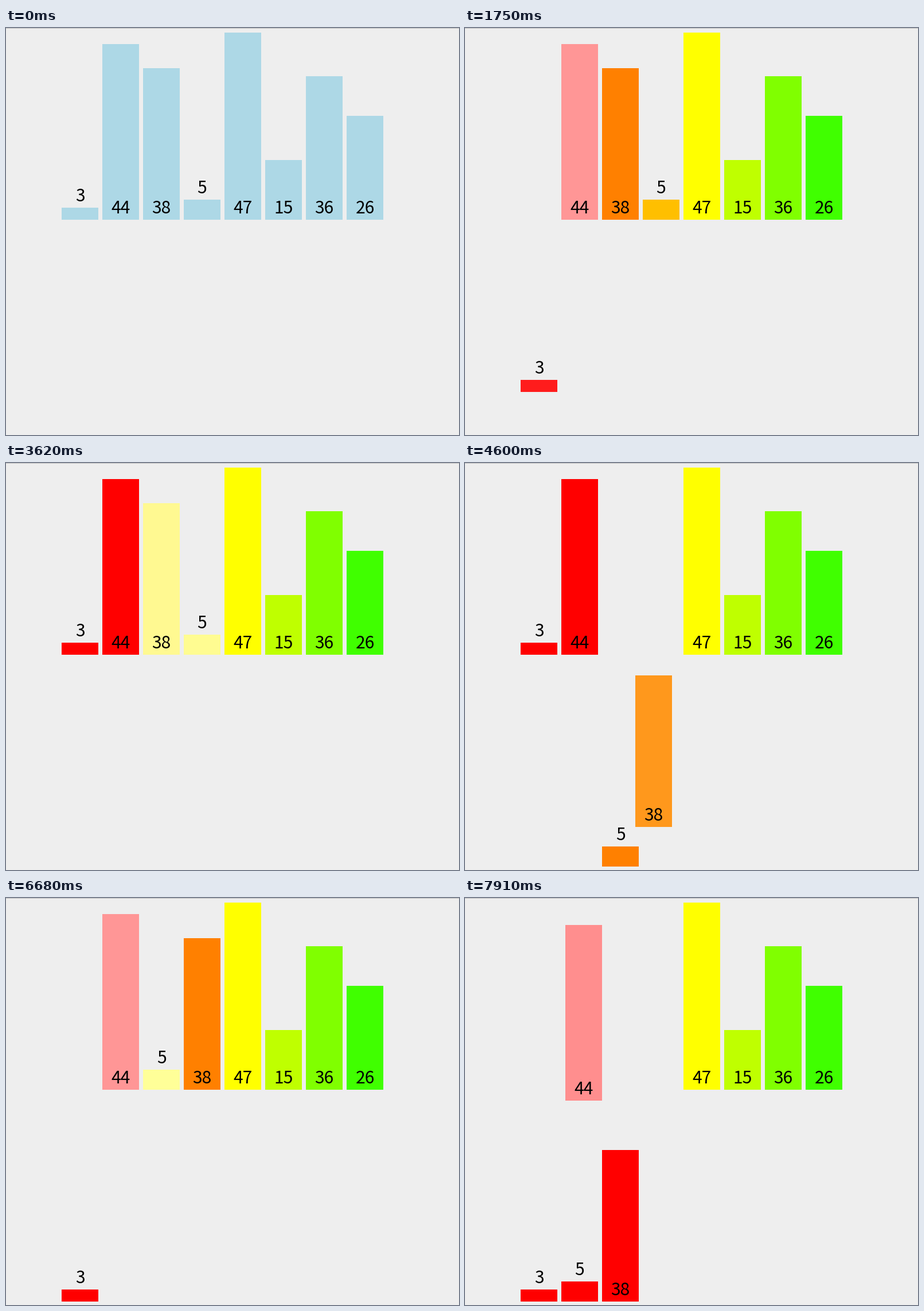
Recreate the animation shown at these times as a matplotlib script. Size 790x709 px, loop 8 s.

```python
import colorsys

import matplotlib.pyplot as plt
import numpy as np
from matplotlib.animation import FuncAnimation
from matplotlib.patches import Rectangle

W, H, DPI = 790, 709, 100
LOOP, STEP = 8000, 20
LEFT, PITCH, BAR_W = 97, 71, 64
BASE = (334, 703)          # baselines of the upper and lower row
UNIT = 6.945               # pixels per value
MOVE_MS = 250

VALUES = [3, 44, 38, 5, 47, 15, 36, 26]
HUES = [tuple(round(c * 255) for c in colorsys.hsv_to_rgb(i * 15 / 360, 1, 1))
        for i in range(len(VALUES))]
START = (173, 216, 230)
RED, ORANGE = HUES[0], HUES[2]
PINK, LEMON = (255, 150, 150), (255, 255, 152)

THREE = (0, 90, 210)
FOUR = (0, 110, 220, 330)


def paint(i, color):
    return i, None, None, color


def move(i, slot, row, color):
    return i, slot, row, color


# (start of the easing, first visible step, step offsets, changes)
EVENTS = [
    (560, 770, (0, 110), [paint(i, c) for i, c in enumerate(HUES)]),
    # merge 3 | 44
    (1030, 1110, THREE, [paint(0, PINK), paint(1, PINK)]),
    (1570, 1640, THREE, [move(0, 0, 1, RED)]),
    (2020, 2090, THREE, [move(1, 1, 1, RED)]),
    (2540, 2640, THREE, [move(0, 0, 0, RED)]),
    (2930, 2970, THREE, [move(1, 1, 0, RED)]),
    # merge 38 | 5
    (3427, 3530, THREE, [paint(2, LEMON), paint(3, LEMON)]),
    (3935, 3960, FOUR, [move(3, 2, 1, ORANGE)]),
    (4440, 4510, THREE, [move(2, 3, 1, ORANGE)]),
    (4915, 4940, FOUR, [move(3, 2, 0, ORANGE)]),
    (5446, 5490, THREE, [move(2, 3, 0, ORANGE)]),
    # merge 3 44 | 5 38
    (5970, 6040, THREE, [paint(0, PINK), paint(3, LEMON)]),
    (6410, 6470, THREE, [move(0, 0, 1, RED), paint(1, PINK)]),
    (6950, 7020, THREE, [move(3, 1, 1, RED), paint(2, LEMON)]),
    (7390, 7460, THREE, [move(2, 2, 1, RED)]),
    (7851, 7910, (0,), [move(1, 3, 1, RED)]),
]
TICKS = [0] + [first + d for _, first, steps, _ in EVENTS for d in steps]


def ease(t):
    t = min(max(t, 0), 1)
    return 4 * t ** 3 if t < 0.5 else 1 - 4 * (1 - t) ** 3


def states(time):
    """Rows of x, baseline, r, g, b for every bar."""
    now = max(t for t in TICKS if t <= time)
    rows = np.array([(LEFT + PITCH * i, BASE[0], *START)
                     for i in range(len(VALUES))], float)
    for start, first, _, changes in EVENTS:
        if now < first:
            break
        k = ease((now - start) / MOVE_MS)
        for i, slot, row, color in changes:
            goal = rows[i].copy()
            goal[2:] = color
            if slot is not None:
                goal[:2] = LEFT + PITCH * slot, BASE[row]
            rows[i] += (goal - rows[i]) * k
    return rows


fig = plt.figure(figsize=(W / DPI, H / DPI), dpi=DPI, facecolor="#eeeeee")
ax = fig.add_axes([0, 0, 1, 1])
ax.set_xlim(0, W)
ax.set_ylim(H, 0)
ax.axis("off")
ax.add_patch(Rectangle((0, 0), W, 1, color="#bfbfbf", lw=0))

bars, labels = [], []
for i, v in enumerate(VALUES):
    bar = Rectangle((0, 0), BAR_W, round(v * UNIT), lw=0, zorder=2 + i)
    bars.append(ax.add_patch(bar))
    labels.append(ax.text(0, 0, str(v), ha="center", va="baseline",
                          family=["Noto Sans CJK JP", "Liberation Sans"],
                          fontsize=30 * 72 / DPI, color="black",
                          zorder=2.5 + i))


def update(n):
    for bar, label, (x, base, *rgb) in zip(bars, labels,
                                           states(n * STEP + STEP / 2)):
        x, base = round(x), round(base)
        height = bar.get_height()
        bar.set_xy((x, base - height))
        bar.set_facecolor(np.array(rgb) / 255)
        # labels sit on top of bars too short to hold them
        foot = base - height if height < 40 else base
        label.set_position((x + BAR_W / 2, foot - 11))
    return bars + labels


anim = FuncAnimation(fig, update, frames=LOOP // STEP, interval=STEP,
                     repeat=True, repeat_delay=0, blit=False)
plt.show()
```
